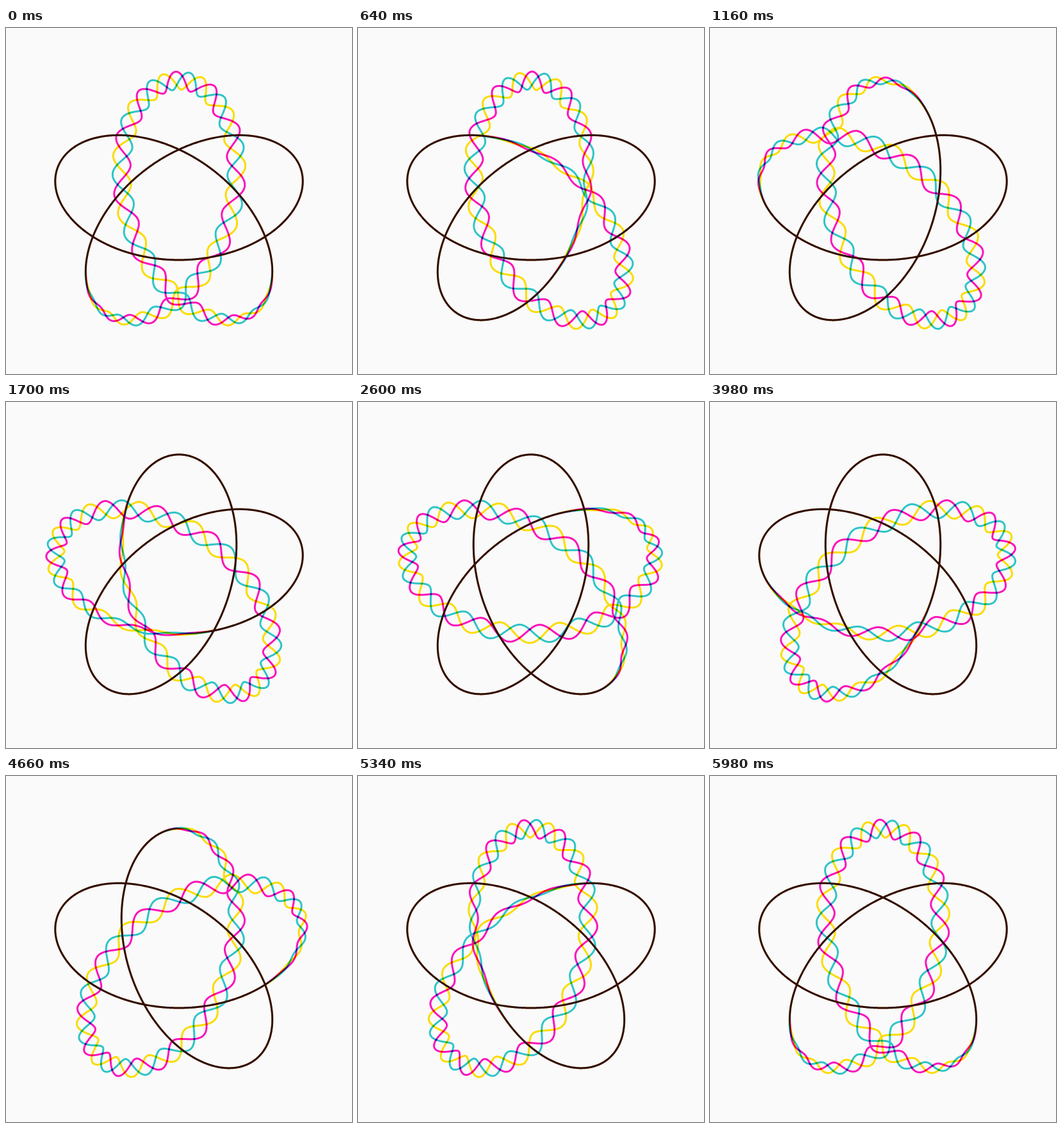
Recreate the animation shown at these times as an HTML page with a canvas. Size 540 px wide and 540 px high, loop 6 s.

```html
<!DOCTYPE html>
<html lang="en">
<head>
<meta charset="utf-8">
<title>Braided knot</title>
<style>
  html, body { margin: 0; width: 100%; height: 100%; overflow: hidden; background: #fafafa; }
  canvas { display: block; width: 540px; height: 540px; }
</style>
</head>
<body>
<canvas id="stage" width="540" height="540"></canvas>
<script>
const ctx = document.getElementById('stage').getContext('2d');
const LOOP = 6000, TAU = Math.PI * 2, RAD = Math.PI / 180;
const CX = 270, CY = 282;      // knot centre
const A = 140, B = 60;         // radii of the two turning arms
const WAVES = 36, AMP = 14;
const FULL = 46, FLAT = 87;    // degrees from the braid's middle: full swing, no swing
const PHASE = 28 * RAD;
const STEPS = 2160;
const STRANDS = [
  { color: 'rgb(48,200,204)', shift: TAU / 3 },
  { color: 'rgb(255,20,190)', shift: 0 },
  { color: 'rgb(255,225,0)', shift: -TAU / 3 }
];

// How strongly the strands swing at a given angle from the braid's middle
function swing(angle) {
  const d = Math.abs(Math.atan2(Math.sin(angle), Math.cos(angle))) / RAD;
  const u = Math.min(1, Math.max(0, (FLAT - d) / (FLAT - FULL)));
  return u * u * (3 - 2 * u);
}

function strand(p, { color, shift }) {
  ctx.beginPath();
  for (let i = 0; i < STEPS; i++) {
    const t = TAU * i / STEPS;
    const x = CX - A * Math.sin(3 * t) + B * Math.sin(2 * t);
    const y = CY - A * Math.cos(3 * t) - B * Math.cos(2 * t);
    const dx = -3 * A * Math.cos(3 * t) + 2 * B * Math.cos(2 * t);
    const dy = 3 * A * Math.sin(3 * t) + 2 * B * Math.sin(2 * t);
    const len = Math.hypot(dx, dy);
    const off = AMP * swing(t - TAU * p) * Math.cos(WAVES * t + TAU * p - PHASE + shift);
    ctx.lineTo(x - dy / len * off, y + dx / len * off);
  }
  ctx.closePath();
  ctx.strokeStyle = color;
  ctx.stroke();
}

function draw(now) {
  const p = (now % LOOP) / LOOP;
  ctx.globalCompositeOperation = 'source-over';
  ctx.fillStyle = '#fafafa';
  ctx.fillRect(0, 0, 540, 540);
  ctx.globalCompositeOperation = 'multiply';
  ctx.lineWidth = 3;
  ctx.lineJoin = 'round';
  STRANDS.forEach(s => strand(p, s));
}

let start = null;
function tick(now) {
  if (start === null) start = now;
  draw(now - start);
  requestAnimationFrame(tick);
}
draw(0);
requestAnimationFrame(tick);
</script>
</body>
</html>
```
